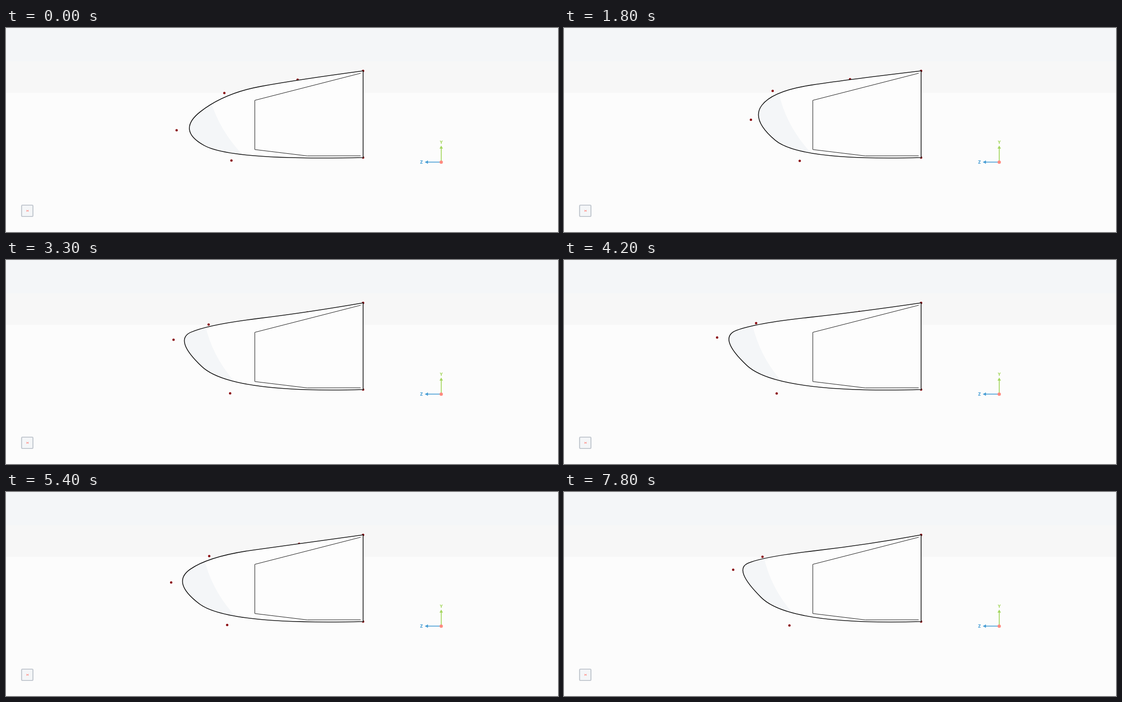
Write an HTML page that moves like this. It is 1168 px wide and 433 px high and loops after 8000 ms.

```html
<!DOCTYPE html>
<html lang="en">
<head>
<meta charset="utf-8">
<title>Spline profile</title>
<style>
  html, body { margin: 0; width: 100%; height: 100%; overflow: hidden; background: #fcfcfc; }
  svg { display: block; width: 1168px; height: 433px; }
  text { font-family: Inter, "Open Sans", sans-serif; font-weight: 800; text-anchor: middle; }
</style>
</head>
<body>
<svg viewBox="0 0 1168 433">
  <defs><clipPath id="inside"><path id="clip"/></clipPath></defs>

  <rect width="1168" height="433" fill="#fcfcfc"/>
  <rect width="1168" height="137.5" fill="#f7f7f7"/>
  <rect width="1168" height="71" fill="#f4f6f8"/>

  <g id="dots" fill="#8b0a10"></g>
  <path id="body" fill="#fdfdfd"/>
  <g clip-path="url(#inside)">
    <path id="shade" fill="#f4f6f8" d="M300 60H403L421 138Q437 209 490 266L510 288H300Z"/>
  </g>
  <path d="M750.5 96L526.5 153.5V258L637.5 271.5L750.5 271.2" fill="none" stroke="#111" stroke-width="1"/>
  <path id="outline" fill="none" stroke="#111" stroke-width="1.6" stroke-linejoin="round"/>

  <g fill="#a4d65e">
    <path d="M920 285V256H917.3L920.9 249.5L924.5 256H921.8V285Z"/>
    <text x="921" y="245.6" font-size="8.6">Y</text>
  </g>
  <g fill="#4a9fd5">
    <path d="M921 283.8H893V281.1L886 284.7L893 288.3V285.6H921Z"/>
    <text x="879" y="288.2" font-size="9">Z</text>
  </g>
  <circle cx="920.9" cy="284.7" r="3.5" fill="#ff8a80"/>

  <rect x="33" y="376" width="24" height="24" rx="2" fill="#f4f6f8" stroke="#c3c8d0" stroke-width="2.2"/>
  <text x="45" y="390.2" font-size="6" fill="#ff8a80" transform="rotate(90 45 388)">X</text>
</svg>

<script>
  const LOOP = 8000, STEP = 300;
  const TOP = [755.6, 91], BOTTOM = [755.6, 275];

  // The designs the profile morphs through; the rest of the shape follows from these.
  const DESIGNS = [
    { at: 0,    brow: [462, 138],   nose: [361, 217],   chin: 477 },
    { at: 1200, brow: [432, 127],   nose: [406, 215.5], chin: 499 },
    { at: 2400, brow: [451, 140],   nose: [385, 174],   chin: 498.5 },
    { at: 4200, brow: [406.5, 134], nose: [324, 164.5], chin: 450 },
    { at: 5400, brow: [430, 136],   nose: [349.5, 192], chin: 468 },
    { at: 6600, brow: [406.5, 127.5], nose: [350.5, 204], chin: 452 },
    { at: 7800, brow: [420, 137.5], nose: [358, 165],   chin: 477 }
  ];

  const $ = id => document.getElementById(id);
  const mix = (a, b, k) => a + (b - a) * k;
  const mixPoint = (a, b, k) => [mix(a[0], b[0], k), mix(a[1], b[1], k)];

  const dots = Array.from({ length: 6 }, () => {
    const dot = document.createElementNS("http://www.w3.org/2000/svg", "circle");
    dot.setAttribute("r", 2.5);
    return $("dots").appendChild(dot);
  });

  function designAt(time) {
    const i = DESIGNS.findLastIndex(d => d.at <= time);
    const a = DESIGNS[i], b = DESIGNS[i + 1];
    if (!b) return a;
    const k = (time - a.at) / (b.at - a.at);
    return {
      brow: mixPoint(a.brow, b.brow, k),
      nose: mixPoint(a.nose, b.nose, k),
      chin: mix(a.chin, b.chin, k)
    };
  }

  // A lower brow and a higher nose push the roof control backwards and down.
  function controls({ brow, nose, chin }) {
    const roofX = 621.5 + 5.4 * (brow[1] - 136.2) - 0.56 * (nose[1] - 191.7);
    const roof = [roofX, 105 + 0.076 * (roofX - 555.5)];
    const keel = [chin, 283.2 - 0.035 * (nose[1] - 164)];
    return [TOP, roof, brow, nose, keel, BOTTOM];
  }

  // The reflection edge follows the tip and bends back on blunt shapes.
  function shadeShift({ brow, nose, chin }) {
    const tip = 0.75 * nose[0] + 0.125 * (brow[0] + chin);
    return 0.86 * (tip - 350) - 0.7 * (brow[1] - 132.5) - 21;
  }

  // clamped quadratic B-spline: joints lie halfway between inner controls
  function spline(points) {
    const last = points.length - 2;
    let d = `M${points[0]}`;
    for (let i = 1; i <= last; i++) {
      d += `Q${points[i]} ${mixPoint(points[i], points[i + 1], i === last ? 1 : 0.5)}`;
    }
    return d + "Z";
  }

  function draw(time) {
    const design = designAt(Math.floor(time / STEP) * STEP);
    const points = controls(design);
    const path = spline(points);
    for (const id of ["clip", "body", "outline"]) $(id).setAttribute("d", path);
    $("shade").setAttribute("transform", `translate(${shadeShift(design)} 0)`);
    dots.forEach((dot, i) => {
      dot.setAttribute("cx", points[i][0]);
      dot.setAttribute("cy", points[i][1]);
    });
  }

  const start = performance.now();
  function tick() {
    draw((performance.now() - start) % LOOP);
    requestAnimationFrame(tick);
  }
  tick();
</script>
</body>
</html>
```
